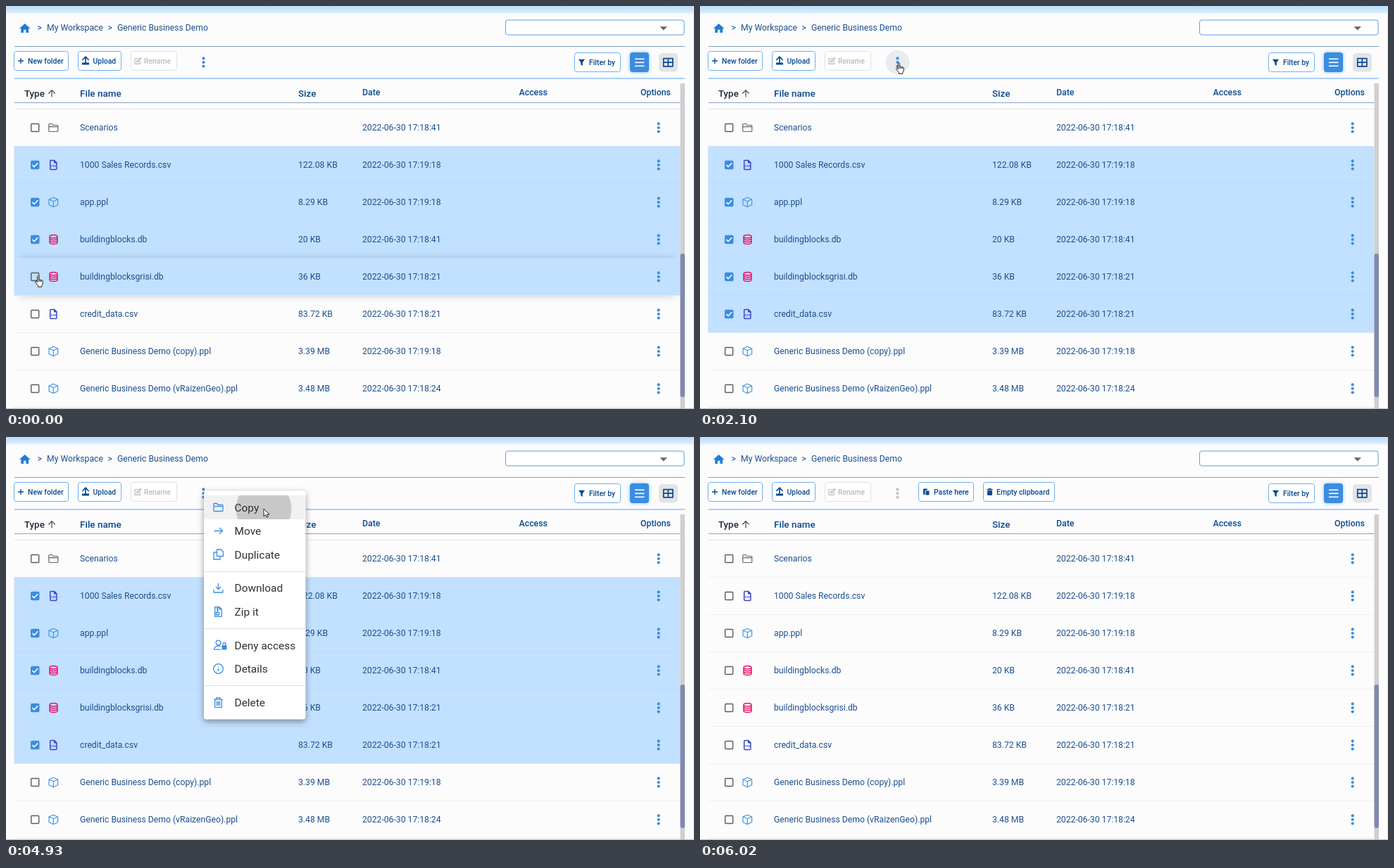
Animation, 977 px wide and 573 px high, one loop 6.43 s. Source, as an HTML page with a canvas:

```html
<!DOCTYPE html>
<html lang="en">
<head>
<meta charset="utf-8">
<title>File manager</title>
<style>
html, body { margin: 0; width: 100%; height: 100%; overflow: hidden; background: #fcfcfd; }
canvas { display: block; }
</style>
</head>
<body>
<canvas id="stage" width="977" height="573"></canvas>
<script>
const ctx = document.getElementById('stage').getContext('2d');
const LOOP = 6430;
const BLUE = '#3a8de0', NAVY = '#0b4a8f', INK = '#1d4f8e', PAGE = '#fcfcfd', PICK = '#c2e0ff';
const ROW_TOP = 146.5, ROW_H = 53;

const rows = [
  ['folder', 'Scenarios', '', '18:41'],
  ['csv', '1000 Sales Records.csv', '122.08 KB', '19:18'],
  ['cube', 'app.ppl', '8.29 KB', '19:18'],
  ['db', 'buildingblocks.db', '20 KB', '18:41'],
  ['db', 'buildingblocksgrisi.db', '36 KB', '18:21'],
  ['csv', 'credit_data.csv', '83.72 KB', '18:21'],
  ['cube', 'Generic Business Demo (copy).ppl', '3.39 MB', '19:18'],
  ['cube', 'Generic Business Demo (vRaizenGeo).ppl', '3.48 MB', '18:24']
];

// time, pointer shape, x, y, hovered row
const moves = [
  [0, 'hand', 41, 383, 4], [140, 'hand', 41, 384, 4], [300, 'hand', 41, 408, 4],
  [450, 'hand', 41, 428, 5], [580, 'hand', 41, 432, 5], [990, 'hand', 41, 433, 5],
  [1140, 'hand', 125, 407, 5], [1280, 'hand', 190, 320, -1], [1420, 'hand', 251, 204, 2],
  [1560, 'hand', 272, 109, 0], [1700, 'hand', 277, 86, -1], [1820, 'hand', 277, 79, -1],
  [1960, 'hand', 280, 79, -1], [2100, 'hand', 278, 80, -1], [3200, 'arrow', 282, 81, -1],
  [3450, 'arrow', 300, 88, -1], [3570, 'arrow', 322, 96, -1], [3720, 'arrow', 338, 101, -1],
  [3850, 'arrow', 348, 106, -1], [3980, 'arrow', 357, 109, -1], [4110, 'arrow', 362, 105, -1],
  [4260, 'arrow', 366, 102, -1], [5320, 'arrow', 402, 124, -1], [5450, 'arrow', 439, 146, -1],
  [5610, 'hand', 873, 499, 5], [5750, 'hand', 806, 556, 7], [5880, '', 0, 0, -1]
];

const menu = [
  ['Copy', 100, 'folder'], ['Move', 133.5, 'right'], ['Duplicate', 167, 'copies'],
  ['Download', 214.5, 'down'], ['Zip it', 248.5, 'zip'], ['Deny access', 296, 'user'],
  ['Details', 329.5, 'info'], ['Delete', 377.5, 'trash']
];

// outlines centred on 0,0
const shapes = {
  folder: 'M-6.5 4.5V-4.5Q-6.5-5.5-5.5-5.5H-2L-.5-3.5H5.5Q6.5-3.5 6.5-2.5V4.5Q6.5 5.5 5.5 5.5H-5.5Q-6.5 5.5-6.5 4.5ZM-6.5-1.3H6.5',
  cube: 'M0-6.7L6.3-4V3.7L0 6.7L-6.3 3.7V-4ZM-6.3-4L0-1.3L6.3-4M0-1.3V6.7',
  db: 'M-5.5-4.2C-5.5-7.2 5.5-7.2 5.5-4.2V4.2C5.5 7.2-5.5 7.2-5.5 4.2ZM-5.5-4.2C-5.5-1.4 5.5-1.4 5.5-4.2M-5.5-1.4C-5.5 1.4 5.5 1.4 5.5-1.4M-5.5 1.5C-5.5 4.3 5.5 4.3 5.5 1.5',
  csv: 'M-4.6-5.4Q-4.6-6.4-3.6-6.4H1.4L4.6-3.2V5.4Q4.6 6.4 3.6 6.4H-3.6Q-4.6 6.4-4.6 5.4ZM1.4-6.4V-3.2H4.6',
  right: 'M-6 0H6M1.5-4.5L6 0L1.5 4.5',
  copies: 'M-2-7H4L7-4V2.5H-2ZM-2-3H-6.5V7H2.5V2.5',
  down: 'M0-6.5V2M-3.5-1.5L0 2L3.5-1.5M-6.5 2.5V6.5H6.5V2.5',
  zip: 'M-4.8-6.8H1.6L4.8-3.6V6.8H-4.8ZM-1-6.8V1M-3 1H1V4.5H-3ZM-2.5-5H0M-2.5-2.5H0M1.6-6.8V-3.6H4.8',
  user: 'M1-3.5A3.4 3.4 0 1 1-5.8-3.5A3.4 3.4 0 1 1 1-3.5M-8.5 6.2C-8.5 1-2 .5 .5 2M-8.5 6.2H1M4-.2V-1.5C4-4.2 8-4.2 8-1.5V.5',
  info: 'M6.8 0A6.8 6.8 0 1 1-6.8 0A6.8 6.8 0 1 1 6.8 0M0-.8V3.6M0-3.6V-2.5',
  trash: 'M-6-4.5H6M-2.5-4.5V-6.8H2.5V-4.5M-4.8-4.5V6.8H4.8V-4.5M-2-2V4.5M0-2V4.5M2-2V4.5',
  house: 'M-7.8 .3L0-6.8L7.8 .3H5.4V6.3H1.7V2H-1.7V6.3H-5.4V.3Z',
  funnel: 'M-4.6-4.5H4.6L1.3 0V4.6L-1.3 3V0Z',
  plus: 'M-4 0H4M0-4V4',
  pencil: 'M0-3.5H-4V4.3H3.5V1M-1.5 1.8L-1 0L3.5-4.5L5-3L.5 1.5Z',
  grid: 'M-6.6-5.6H6.6V5.6H-6.6ZM0-5.6V5.6M-6.6 0H6.6',
  sort: 'M0 5V-4.6M-4.6 0L0-4.8L4.6 0',
  tick: 'M-3.8 0L-1.2 2.7L4-2.8',
  hand: 'M3.5 10V1.7Q3.5.6 4.5.6Q5.6.6 5.6 1.7V6Q6.7 5.3 7.5 6.4Q8.7 5.8 9.3 7Q11.2 6.6 11.2 8.4V11Q11.2 13 9.8 14.2V16.3H4.4V14.4Q2 12 .7 9.8Q.3 8.3 1.5 8.2Q2.6 8.5 3.5 10ZM5.6 6V9M7.5 6.4V9M9.3 7V9.3',
  arrow: 'M0 0V11L2.6 8.6L4.3 12.3L6.1 11.5L4.5 8H7.9Z'
};
for (const k in shapes) shapes[k] = new Path2D(shapes[k]);

function icon(name, x, y, stroke, width = 1.2, fill) {
  ctx.save();
  ctx.translate(x, y);
  ctx.lineWidth = width;
  ctx.lineJoin = 'round';
  if (fill) { ctx.fillStyle = fill; ctx.fill(shapes[name]); }
  if (stroke) { ctx.strokeStyle = stroke; ctx.stroke(shapes[name]); }
  ctx.restore();
}

function text(s, x, y, size = 12.2, color = INK, weight = 400) {
  ctx.font = `${weight} ${size}px Roboto, sans-serif`;
  ctx.fillStyle = color;
  ctx.fillText(s, x, y);
}

function rect(x, y, w, h, color) {
  ctx.fillStyle = color;
  ctx.fillRect(x, y, w, h);
}

function box(x, y, w, h, r, fill, stroke) {
  ctx.beginPath();
  ctx.roundRect(x, y, w, h, r);
  if (fill) { ctx.fillStyle = fill; ctx.fill(); }
  if (stroke) { ctx.strokeStyle = stroke; ctx.lineWidth = 1; ctx.stroke(); }
}

function disc(x, y, r, color) {
  ctx.beginPath();
  ctx.arc(x, y, r, 0, 7);
  ctx.fillStyle = color;
  ctx.fill();
}

function dots(x, y, color, gap = 5.6) {
  for (const k of [-1, 0, 1]) disc(x, y + k * gap, 2.1, color);
}

function shadow(color, blur, dy = 0) {
  ctx.shadowColor = color;
  ctx.shadowBlur = blur;
  ctx.shadowOffsetY = dy;
}

function button(x, w, label, tx, color = NAVY, border = '#6db0f0', y = 64.5) {
  box(x, y, w, 27, 3, '#fff', border);
  text(label, tx, y + 17.5, 10.4, color, 500);
}

function toolbar(t) {
  const pasted = t >= 5060;
  button(11.5, 77, 'New folder', 31, NAVY);
  icon('plus', 21, 78, NAVY, 1.4);
  button(102.5, 61, 'Upload', 123.5, NAVY);
  rect(108, 80.5, 10, 3, NAVY);
  icon('sort', 113, 77, NAVY, 1.7);
  button(177.5, 65, 'Rename', 196, '#b9bcc0', '#dfe1e4');
  icon('pencil', 187, 78, '#b9bcc0', 1.2);

  if (t >= 1700 && t < 3200) disc(280.5, 80, 17, t >= 2790 ? '#d3d8de' : '#e8ebef');
  dots(280.5, 80, pasted ? '#c0c2c5' : BLUE);

  if (pasted) {
    button(310.5, 78, 'Paste here', 332, NAVY);
    box(317, 73.5, 6, 8.5, 1, NAVY);
    box(320, 76, 6, 7, 1, NAVY, '#fff');
    button(402.5, 101, 'Empty clipboard', 421, NAVY);
    box(407.5, 74, 8, 1.4, 0, NAVY);
    box(409.5, 73, 4, 1.4, 0, NAVY);
    box(408, 76, 7, 7, 1, NAVY);
  }

  button(807.5, 65, 'Filter by', 828, NAVY, '#6db0f0', 66.5);
  icon('funnel', 817.5, 80.3, null, 1, NAVY);
  ctx.save();
  shadow('rgba(58,141,224,.6)', 5);
  box(886, 66, 27, 28, 4, BLUE);
  ctx.restore();
  for (const y of [74.5, 79.5, 84.5]) rect(893, y, 13.5, 1.6, '#fff');
  box(927, 67, 27, 26.5, 5, '#e3e4e6');
  icon('grid', 940.3, 80.2, NAVY, 1.7);
}

function header() {
  const g = ctx.createLinearGradient(0, 0, 0, 12);
  g.addColorStop(0, '#b9dcfb');
  g.addColorStop(0.7, '#d6eafd');
  g.addColorStop(1, PAGE);
  rect(0, 0, 977, 12, g);
  icon('house', 26.7, 31.7, null, 1, '#1f7bd8');
  text('>', 44.5, 35, 12.2, NAVY);
  text('My Workspace', 58, 35, 12.2, INK);
  text('>', 144.5, 35, 12.2, NAVY);
  text('Generic Business Demo', 158, 35, 12.2, INK);
  box(709.5, 20, 253.5, 21, 3, '#fff', '#5b9fe0');
  ctx.beginPath();
  ctx.moveTo(928.5, 29.3);
  ctx.lineTo(939, 29.3);
  ctx.lineTo(933.7, 34.5);
  ctx.fillStyle = '#666';
  ctx.fill();
  rect(12, 57, 952, 1, '#7f9dc3');
  rect(12, 102.5, 952, 1, '#5ba6ec');

  text('Type', 26, 129, 13.4, '#222c3a', 500);
  icon('sort', 65, 124.5, '#444b55', 1.2);
  text('File name', 105, 129, 13.5, NAVY, 500);
  text('Size', 415, 129, 13.4, NAVY, 500);
  text('Date', 506, 127, 12.3, NAVY, 500);
  text('Access', 728.5, 127, 12.3, NAVY, 500);
  text('Options', 901, 127, 12.3, NAVY, 500);
  rect(12, 137, 946, 1, '#8ba3c3');
  rect(12, 146, 946, 1, '#e4e6e9');
}

function fileIcon(kind, y) {
  if (kind === 'folder') icon(kind, 67.3, y, '#666');
  if (kind === 'cube') icon(kind, 67.3, y, '#3f97e8');
  if (kind === 'db') icon(kind, 67.5, y, '#e8156b', 1.5);
  if (kind === 'csv') {
    icon(kind, 67.3, y, '#3a45c4', 1.5);
    text('CSV', 63.6, y + 3, 3.9, '#3a45c4', 700);
  }
}

function row(i, picked, hovered) {
  const [kind, name, size, time] = rows[i];
  const top = ROW_TOP + i * ROW_H, y = top + 26.5;
  rect(11.5, top, 946, ROW_H, picked || hovered ? PICK : PAGE);
  rect(11.5, top + ROW_H - 0.5, 946, 1, picked ? '#b9d7f3' : '#e4e6e9');
  if (picked) {
    box(35, y - 6.2, 12.5, 12.5, 2, BLUE);
    icon('tick', 41.2, y, '#fff', 1.6);
  } else {
    ctx.strokeStyle = '#5a5d61';
    ctx.lineWidth = 1.4;
    ctx.beginPath();
    ctx.roundRect(35.7, y - 5.5, 11, 11, 1);
    ctx.stroke();
  }
  fileIcon(kind, y);
  text(name, 105, y + 4);
  text(size, 415, y + 4);
  text('2022-06-30 17:' + time, 506, y + 4);
  dots(926.7, y, BLUE);
}

function list(t, hover) {
  const picked = i => t < 5060 && ((i > 0 && i < 4) || (i === 4 && t >= 300) || (i === 5 && t >= 860));
  rows.forEach((_, i) => row(i, picked(i), false));
  if (hover < 0) return;
  const top = ROW_TOP + hover * ROW_H;
  ctx.save();
  ctx.beginPath();
  ctx.rect(11.5, 138, 946, 435);
  ctx.clip();
  shadow('rgba(33,33,33,.24)', 11);
  rect(19, top, 931, ROW_H, PICK);
  ctx.restore();
  row(hover, picked(hover), true);
}

function popup(t) {
  if (t < 2920 || t >= 5060) return;
  ctx.save();
  if (t < 3060) {
    ctx.globalAlpha = 0.6;
    ctx.translate(281, 76);
    ctx.scale(0.96, 0.96);
    ctx.translate(-281, -76);
  }
  ctx.save();
  shadow('rgba(0,0,0,.4)', 9, 3);
  box(281, 76.5, 144.5, 325, 4, '#fff');
  ctx.restore();
  if (t >= 3570) rect(281, 83, 144.5, 34, '#f1f1f1');
  if (t >= 4800) {
    ctx.save();
    ctx.beginPath();
    ctx.rect(281, 83, 144.5, 34);
    ctx.clip();
    disc(366, 102, t < 4930 ? 14 : 39.5, '#c8c8c8');
    ctx.restore();
  }
  for (const y of [191, 272, 353]) rect(281, y, 144.5, 1, '#dedede');
  for (const [label, y, name] of menu) {
    const x = name === 'user' ? 304 : 301.5;
    icon(name, x, y, BLUE, 1.3);
    if (name === 'user') box(x + 2.5, y, 7, 6.5, 1, BLUE);
    text(label, 324.5, y + 5.5, 15.45, '#2f3133');
  }
  ctx.restore();
}

function scene(t) {
  const [, shape, x, y, hover] = moves.findLast(m => m[0] <= t);
  rect(0, 0, 977, 573, PAGE);
  list(t, hover);
  header();
  toolbar(t);
  rect(957.5, 110, 6.5, 463, '#cfcfcf');
  box(957.5, 352, 6.5, 204, 3, '#7f8aaf');
  rect(0, 572, 977, 1, '#b9bcc1');
  rect(976, 0, 1, 573, '#dcdfe4');
  popup(t);
  if (shape) icon(shape, x, y, '#222', 1, '#fff');
}

const start = performance.now();
function tick() {
  scene((performance.now() - start) % LOOP);
  requestAnimationFrame(tick);
}
tick();
</script>
</body>
</html>
```
